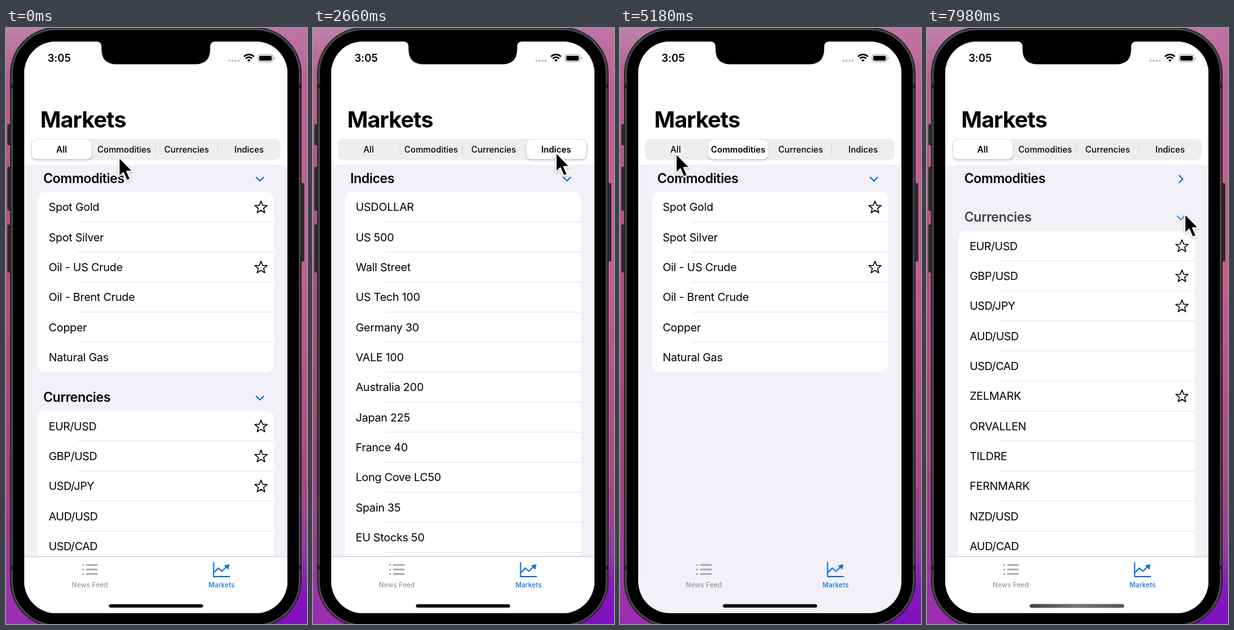
Recreate the animation shown at these times as an HTML page. Size 446 by 880 pixels, loop 8000 ms.

```html
<!DOCTYPE html>
<html lang="en">
<head>
<meta charset="utf-8">
<title>Markets</title>
<style>
  html, body { margin: 0; width: 100%; height: 100%; overflow: hidden; background: #a8487f; }
  svg { display: block; width: 100vw; height: 100vh; }
  text { font-family: Inter, Roboto, "Liberation Sans", sans-serif; font-optical-sizing: none; fill: #000; }
  .row { font-size: 16.5px; letter-spacing: -.22px; }
  .pair { letter-spacing: -.4px; }
  .head { font-size: 19.4px; font-weight: 600; letter-spacing: -.36px; }
  .title { font-size: 33px; font-weight: 700; letter-spacing: -.75px; }
  .seg { font-size: 12.6px; font-weight: 500; letter-spacing: .02px; text-anchor: middle; }
  .tab { font-size: 9.8px; font-weight: 500; letter-spacing: .15px; text-anchor: middle; }
  .clock { font-size: 15.6px; font-weight: 600; letter-spacing: -.1px; }
  .line { fill: none; stroke-linecap: round; stroke-linejoin: round; }
</style>
</head>
<body>
<svg viewBox="0 0 446 880" preserveAspectRatio="none">
  <defs>
    <linearGradient id="wallLeft" x2="0" y2="1">
      <stop offset="0" stop-color="#bf82ab"/><stop offset=".08" stop-color="#b5618f"/>
      <stop offset=".4" stop-color="#b4517d"/><stop offset=".7" stop-color="#a2477a"/>
      <stop offset=".9" stop-color="#9a3a9a"/><stop offset="1" stop-color="#9a2cb2"/>
    </linearGradient>
    <linearGradient id="wallRight" x2="0" y2="1">
      <stop offset="0" stop-color="#bd74a4"/><stop offset=".1" stop-color="#c06096"/>
      <stop offset=".4" stop-color="#c65f90"/><stop offset=".75" stop-color="#aa4a84"/>
      <stop offset=".88" stop-color="#933a9e"/><stop offset=".94" stop-color="#8418bc"/>
      <stop offset="1" stop-color="#7f10c0"/>
    </linearGradient>
    <linearGradient id="homeGrey">
      <stop offset="0" stop-color="#444"/><stop offset=".5" stop-color="#777"/><stop offset="1" stop-color="#555"/>
    </linearGradient>
    <clipPath id="screen"><rect x="27" y="20" width="390" height="844" rx="47"/></clipPath>
    <clipPath id="listArea"><rect x="27" y="202" width="390" height="578"/></clipPath>
    <filter id="soft" x="-30%" y="-30%" width="160%" height="180%">
      <feDropShadow dx="0" dy="1.5" stdDeviation="1.5" flood-opacity=".25"/>
    </filter>
  </defs>

  <rect width="223" height="880" fill="url(#wallLeft)"/>
  <rect x="223" width="223" height="880" fill="url(#wallRight)"/>
  <g fill="#2b2a2e">
    <rect x="2" y="142" width="8" height="31" rx="2"/>
    <rect x="2" y="205" width="8" height="65" rx="2"/>
    <rect x="2" y="290" width="8" height="71" rx="2"/>
    <rect x="434" y="229" width="8" height="116" rx="2"/>
  </g>
  <rect x="6" y="-1" width="432" height="886" rx="68" fill="#232326"/>
  <rect x="9" y="2" width="426" height="880" rx="65" stroke="#4a494d" stroke-width="2.4"/>
  <path d="M6 86h5M433 86h5M6 797h5M433 797h5" stroke="#1d1d20" stroke-width="5"/>

  <g clip-path="url(#screen)">
    <rect x="27" y="20" width="390" height="844" fill="#f2f1f7"/>
    <g id="lists" clip-path="url(#listArea)"></g>
    <rect x="27" y="20" width="390" height="182" fill="#fff"/>
    <g id="bar">
      <rect x="27" y="780" width="390" height="84" fill="#fff"/>
      <path d="M27 780.5H417" stroke="#cbcace"/>
    </g>

    <text class="clock" x="61.5" y="50.2">3:05</text>
    <g fill="#c4c4c6">
      <circle cx="331.3" cy="48.3" r="1.7"/><circle cx="335.8" cy="48.3" r="1.7"/>
      <circle cx="340.3" cy="48.3" r="1.7"/><circle cx="344.8" cy="48.3" r="1.7"/>
    </g>
    <path d="M360 50l-2.5-2.6a3.6 3.6 0 0 1 5 0z"/>
    <path d="M355.3 45.1a6.7 6.7 0 0 1 9.4 0M352.5 42.2a10.6 10.6 0 0 1 15 0" fill="none" stroke="#000" stroke-width="2.2"/>
    <rect x="373.5" y="39.2" width="22" height="10.8" rx="3.2" fill="none" stroke="#9b9b9d"/>
    <rect x="375.2" y="40.9" width="18.6" height="7.4" rx="1.8"/>
    <path d="M397 42.8q1.4.5 1.4 1.8t-1.4 1.8z" fill="#9b9b9d"/>

    <text class="title" x="50.7" y="147">Markets</text>
    <rect x="37" y="163.5" width="370" height="31.5" rx="8.5" fill="#eeeeef"/>
    <g id="segments"></g>

    <g class="line" stroke="#98989b" stroke-width="1.9">
      <path d="M119.5 792.7h15.5M119.5 799.5h15.5M119.5 806.3h15.5"/>
      <path d="M113.8 792.7h.9M113.8 799.5h.9M113.8 806.3h.9"/>
    </g>
    <text class="tab" x="124.3" y="825.8" style="fill:#98989b">News Feed</text>
    <g class="line" stroke="#1274dc" stroke-width="1.9">
      <path d="M307.6 789.5V810H331"/>
      <path d="M308.6 803.5l6-6 5.4 4.6 7-7"/>
      <path d="M324 794l6.4-1.6-1.3 6.4z" fill="#1274dc" stroke-width="1.2"/>
    </g>
    <text class="tab" x="319.5" y="825.8" style="fill:#1274dc">Markets</text>
    <rect x="152.5" y="850.8" width="139.5" height="5" rx="2.5"/>
    <rect id="homeDim" x="152.5" y="850.8" width="139.5" height="5" rx="2.5" fill="url(#homeGrey)"/>
  </g>
  <path d="M134 19v1q7.5 0 7.5 8v3q0 22.5 22 22.5h117q22 0 22-22.5v-3q0-8 7.5-8v-1z"/>
  <path id="cursor" d="M0 0V28.5L6.4 22.5 11.4 34.2 16.6 32 11.6 20.6H20.3Z" stroke="#fff" stroke-width="1.7" stroke-linejoin="round" filter="url(#soft)"/>
</svg>
<script>
const LOOP = 8000, ROW = 44.33, BLUE = "#1274dc";
const $ = id => document.getElementById(id);

function el(parent, tag, attrs = {}, text) {
  const node = document.createElementNS("http://www.w3.org/2000/svg", tag);
  for (const key in attrs) node.setAttribute(key, attrs[key]);
  if (text) node.textContent = text;
  parent.append(node);
  return node;
}

const SECTIONS = [
  { name: "Commodities", stars: [0, 2],
    rows: ["Spot Gold", "Spot Silver", "Oil - US Crude", "Oil - Brent Crude", "Copper", "Natural Gas"] },
  { name: "Currencies", stars: [0, 1, 2, 5],
    rows: ["EUR/USD", "GBP/USD", "USD/JPY", "AUD/USD", "USD/CAD", "ZELMARK", "ORVALLEN", "TILDRE",
           "FERNMARK", "NZD/USD", "AUD/CAD", "AUD/JPY", "AUD/NZD"] },
  { name: "Indices", stars: [],
    rows: ["USDOLLAR", "US 500", "Wall Street", "US Tech 100", "Germany 30", "VALE 100", "Australia 200",
           "Japan 225", "France 40", "Long Cove LC50", "Spain 35", "EU Stocks 50", "Sweden 30"] }
];

const starPath = "M" + Array.from({ length: 10 }, (_, i) => {
  const r = i % 2 ? 4.1 : 9.6, a = i * Math.PI / 5;
  return `${(r * Math.sin(a)).toFixed(2)} ${(-r * Math.cos(a)).toFixed(2)}`;
}).join("L") + "Z";

// Section coordinates are relative to the middle of its heading.
function makeSection(parent, { name, stars, rows }) {
  const root = el(parent, "g");
  const body = el(root, "g");
  const box = el(body, "rect", { x: 47, y: 20, width: 350, rx: 10, fill: "#fff" });
  const items = rows.map((label, i) => {
    const g = el(body, "g");
    el(g, "text", { class: label.includes("/") ? "row pair" : "row", x: 63.2, y: 28.2 }, label);
    if (stars.includes(i))
      el(g, "path", { d: starPath, class: "line", stroke: "#000", "stroke-width": 1.4, transform: "translate(377.8 22.9)" });
    if (i < rows.length - 1)
      el(g, "path", { d: `M107 ${ROW}H397`, stroke: "#dededf", "stroke-width": .8 });
    return g;
  });
  const head = el(root, "g");
  el(head, "text", { class: "head", x: 55.2, y: 6.9 }, name);
  const chevron = el(head, "path", { d: "M-5.3 -2.5L0 2.7 5.3 -2.5", class: "line", stroke: BLUE, "stroke-width": 1.9 });

  // Returns the place of the heading that follows.
  return (y, fold = 0, press = 0) => {
    const pitch = ROW * (1 - fold);
    root.setAttribute("transform", `translate(0 ${y})`);
    items.forEach((g, i) => g.setAttribute("transform", `translate(0 ${20 + pitch * i})`));
    box.setAttribute("height", pitch * (rows.length - 1) + ROW);
    body.setAttribute("opacity", 1 - fold ** 1.5);
    head.setAttribute("opacity", 1 - press);
    chevron.setAttribute("transform", `translate(376.2 .8) rotate(${-90 * fold})`);
    return y + 57.3 + pitch * rows.length;
  };
}

const views = [SECTIONS, ...SECTIONS.map(s => [s])].map(list => {
  const root = el($("lists"), "g");
  return { root, place: list.map(s => makeSection(root, s)) };
});

const dividers = [129, 221.5, 313.5].map(x =>
  el($("segments"), "path", { d: `M${x} 171v16.5`, stroke: "#d8d8db" }));
const thumb = el($("segments"), "rect", { y: 165, width: 88.5, height: 28.5, rx: 7, fill: "#fff", filter: "url(#soft)" });
const labels = ["All", ...SECTIONS.map(s => s.name)].map((name, i) =>
  el($("segments"), "text", { class: "seg", x: 82.5 + 92.6 * i, y: 183.7 }, name));

const clamp = v => Math.max(0, Math.min(1, v));
const ease = v => v * v * (3 - 2 * v);
const ramp = (t, from, to) => ease(clamp((t - from) / (to - from)));

// [time, view]
const picks = [[-1000, 0], [420, 1], [1400, 2], [2380, 3], [3640, 2], [4480, 1], [5360, 0]];

// [time, x, y] of the pointer tip
const path = [
  [0, 167.5, 191], [840, 170, 189], [1260, 244, 179.5], [1590, 246, 180], [1960, 355.5, 183.5],
  [2240, 360, 184], [3080, 360, 184], [3430, 297, 183.5], [3570, 268, 183], [4000, 266, 184],
  [4380, 174, 185], [4800, 172, 185], [5180, 83, 185.5], [5700, 83, 185.5], [6400, 375, 227],
  [7200, 375, 227], [7700, 379, 272], [7910, 380, 273], [7980, 382, 274.5]
];

function pointerAt(t) {
  const n = path.findIndex(p => p[0] > t);
  if (n < 0) return path[path.length - 1].slice(1);
  const [a, b] = [path[n - 1], path[n]], k = ramp(t, a[0], b[0]);
  return [a[1] + (b[1] - a[1]) * k, a[2] + (b[2] - a[2]) * k];
}

function draw(t) {
  const n = picks.filter(p => p[0] <= t).length - 1;
  const [since, view] = picks[n];
  const before = n ? picks[n - 1][1] : view;
  const pos = before + (view - before) * ramp(t, since, since + 250);
  thumb.setAttribute("x", 38.3 + 92.6 * pos);
  labels.forEach((s, i) => s.style.fontWeight = i === view ? 600 : 500);
  dividers.forEach((d, i) => d.setAttribute("opacity", i === view || i === view - 1 ? 0 : 1));

  const fold = ramp(t, 6763, 7113);
  const press = [
    .2 * ramp(t, 6600, 6680) * (1 - ramp(t, 6800, 7050)),
    .28 * ramp(t, 7770, 7840)
  ];
  views.forEach(({ root, place }, i) => {
    root.setAttribute("display", i === view ? "inline" : "none");
    if (i !== view) return;
    let y = 222.2;
    place.forEach((put, k) => {
      y = put(y, i === 0 && k === 0 ? fold : 0, i === 0 ? press[k] || 0 : 0);
    });
  });
  $("bar").setAttribute("display", view === 1 ? "none" : "inline");
  $("homeDim").setAttribute("opacity", ramp(t, 6400, 6750));
  $("cursor").setAttribute("transform", `translate(${pointerAt(t).join(" ")})`);
}

const start = performance.now();
function tick() {
  draw((performance.now() - start) % LOOP);
  requestAnimationFrame(tick);
}
tick();
</script>
</body>
</html>
```
